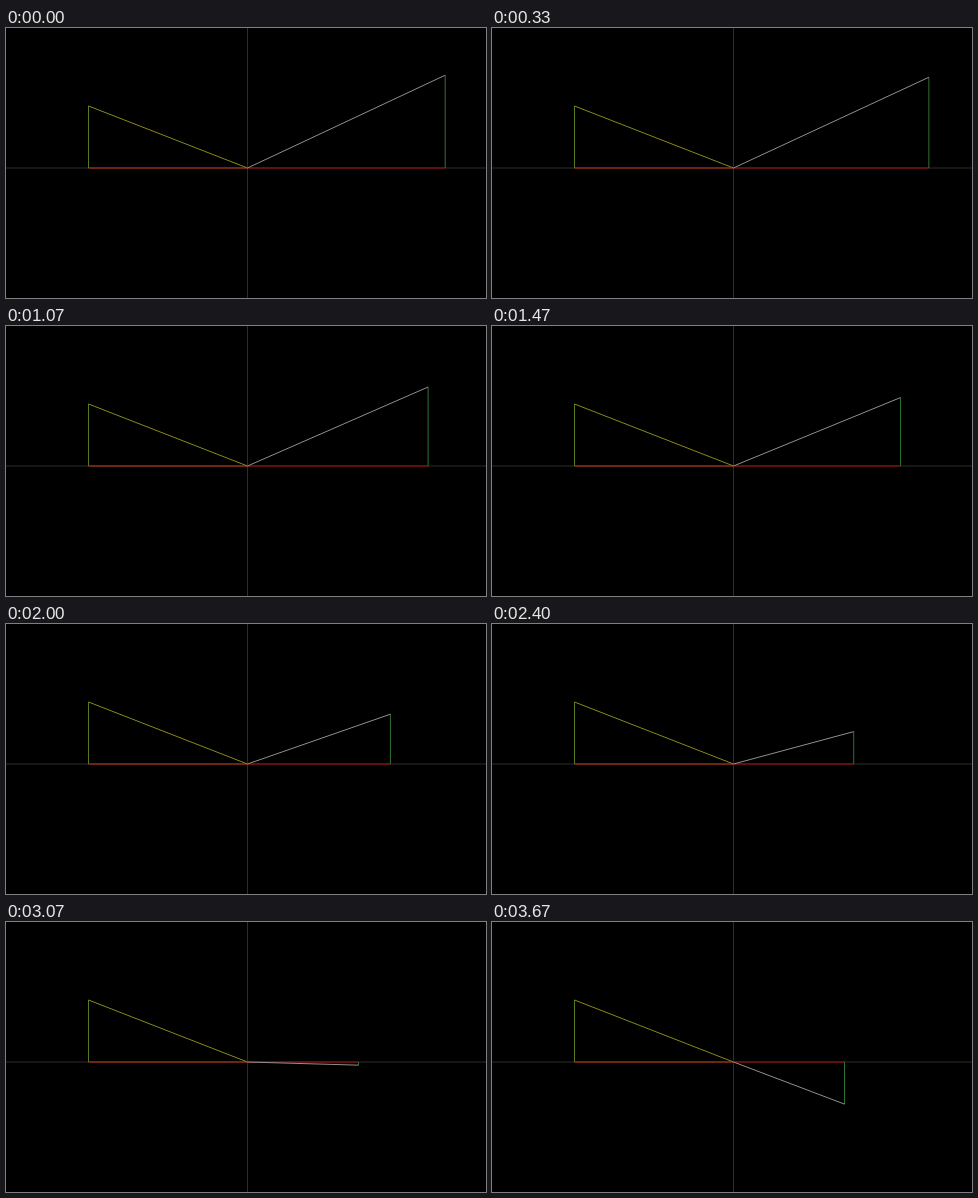
An HTML page for the animation above (4390 ms loop, 480 px wide and 270 px high).

```html
<!DOCTYPE html>
<html lang="en">
<head>
<meta charset="utf-8">
<title>Vector components</title>
<style>
html, body { margin: 0; width: 100%; height: 100%; overflow: hidden; background: #000; }
svg { display: block; width: 480px; height: 270px; }
line { stroke-width: 1; }
</style>
</head>
<body>
<svg viewBox="0 0 480 270">
  <g id="stage" transform="translate(.5 0)"></g>
</svg>
<script>
const LOOP = 4390, STEP = 1000 / 15, LAST = 55;
const origin = { x: 241, y: 140 };
const fixed = { x: 82, y: 78 };
const start = { x: 438.7, y: 47.2 };
const MIN_X = 352;
const stage = document.getElementById('stage');

function line(color, x1, y1, x2, y2) {
  const el = document.createElementNS('http://www.w3.org/2000/svg', 'line');
  el.setAttribute('stroke', color);
  stage.appendChild(el);
  place(el, x1, y1, x2, y2);
  return el;
}

function place(el, x1, y1, x2, y2) {
  Object.entries({ x1, y1, x2, y2 }).forEach(([k, v]) => el.setAttribute(k, v));
}

const { x: ox, y: oy } = origin;
line('#2c2c2c', -1, oy, 481, oy);
line('#2c2c2c', ox, -1, ox, 271);

line('#c83410', fixed.x, oy, ox, oy);
line('#587a1e', fixed.x, oy, fixed.x, fixed.y);
line('#8a8a1a', ox, oy, fixed.x, fixed.y);

const base = line('#b00808', ox, oy, ox, oy);
const rise = line('#2e7432', ox, oy, ox, oy);
const arm = line('#909090', ox, oy, ox, oy);

// Constant acceleration on both axes; x stops at its limit.
function tip(t) {
  return {
    x: Math.max(MIN_X, start.x - 0.003 * t - 1.22e-5 * t * t),
    y: start.y + 0.00314 * t + 9.18e-6 * t * t
  };
}

function draw(ms) {
  const tick = Math.floor(ms / 10) * 10;
  const step = Math.min(LAST, Math.floor((tick + 4) / STEP));
  const { x, y } = tip(step * STEP);
  place(base, ox, oy, x, oy);
  place(rise, x, oy, x, y);
  place(arm, ox, oy, x, y);
}

const began = performance.now();
function run() {
  draw((performance.now() - began) % LOOP);
  requestAnimationFrame(run);
}
run();
</script>
</body>
</html>
```
